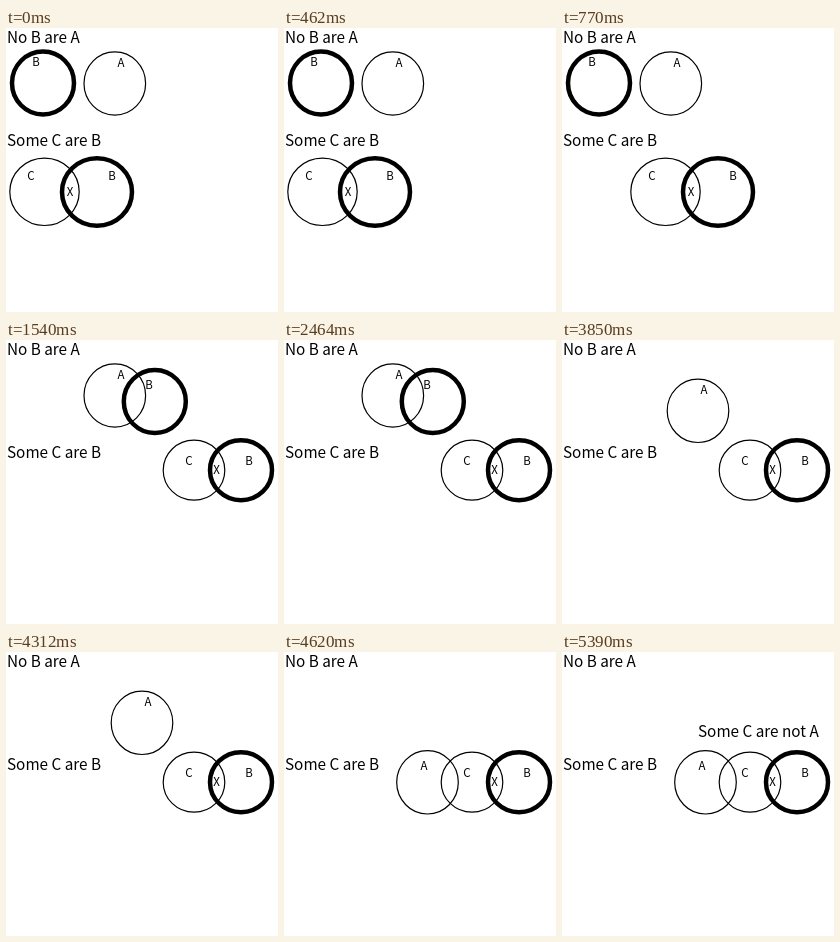
Animation, 272 px wide and 284 px high, one loop 6160 ms. Source, as an HTML page with a canvas:

```html
<!DOCTYPE html>
<html lang="en">
<head>
<meta charset="utf-8">
<title>Syllogism diagram</title>
<style>
html, body { margin: 0; width: 100%; height: 100%; overflow: hidden; background: #fff; }
canvas { display: block; }
</style>
</head>
<body>
<canvas id="stage" width="272" height="284"></canvas>
<script>
const ctx = document.getElementById('stage').getContext('2d');
const BEAT = 770;
const BEATS = 8;
const THIN = 1.2;
const THICK = 4.5;
const FONT = '"Noto Sans CJK SC", "Noto Sans CJK JP", "Noto Sans CJK", "Open Sans", sans-serif';

function ring(x, y, rx, ry, weight) {
  ctx.lineWidth = weight;
  ctx.beginPath();
  ctx.ellipse(x, y, rx, ry, 0, 0, Math.PI * 2);
  ctx.stroke();
}

function label(letter, x, y) {
  ctx.font = '500 11.5px ' + FONT;
  ctx.textAlign = 'center';
  ctx.fillText(letter, x, y + 4);
}

function sentence(text, x, y) {
  ctx.font = '500 15.3px ' + FONT;
  ctx.textAlign = 'left';
  ctx.fillText(text, x, y);
}

function setA(x, y, lx, ly) {
  ring(x, y, 30.8, 31.7, THIN);
  label('A', lx, ly);
}

function setB(x, y, lx, ly) {
  ring(x, y, 31, 31.5, THICK);
  label('B', lx, ly);
}

// The linked C and B circles, large and then shrunk into their final place.
function largePair(dx) {
  ring(38.5 + dx, 163.8, 34.7, 33.7, THIN);
  ring(91 + dx, 164, 35, 33.8, THICK);
  label('C', 25 + dx, 148);
  label('B', 106 + dx, 148);
  label('X', 64 + dx, 163.5);
}

function smallPair() {
  ring(188, 130.2, 30.8, 30, THIN);
  ring(235, 130.2, 31, 30, THICK);
  label('C', 183, 121);
  label('B', 243, 121);
  label('X', 210.5, 130);
}

function draw(beat) {
  ctx.fillStyle = '#fff';
  ctx.fillRect(0, 0, 272, 284);
  ctx.fillStyle = ctx.strokeStyle = '#000';

  sentence('No B are A', 1, 15);
  sentence('Some C are B', 1, 118);

  if (beat < 2) largePair(beat * 65);
  else smallPair();

  if (beat < 5) setA(108.8, 55.5, 115, 34.5);
  else if (beat < 6) setA(136, 70.8, 142, 49.5);
  else setA(143.5, 130.3, 140, 113.5);

  if (beat < 2) setB(37, 55, 30, 34);
  else if (beat < 4) setB(148.8, 61.5, 143, 45);
  else if (beat < 5) setB(210, 81, 207, 65);

  if (beat === 7) sentence('Some C are not A', 136, 85);
}

function tick() {
  draw(Math.floor(performance.now() / BEAT) % BEATS);
  requestAnimationFrame(tick);
}
tick();
</script>
</body>
</html>
```
